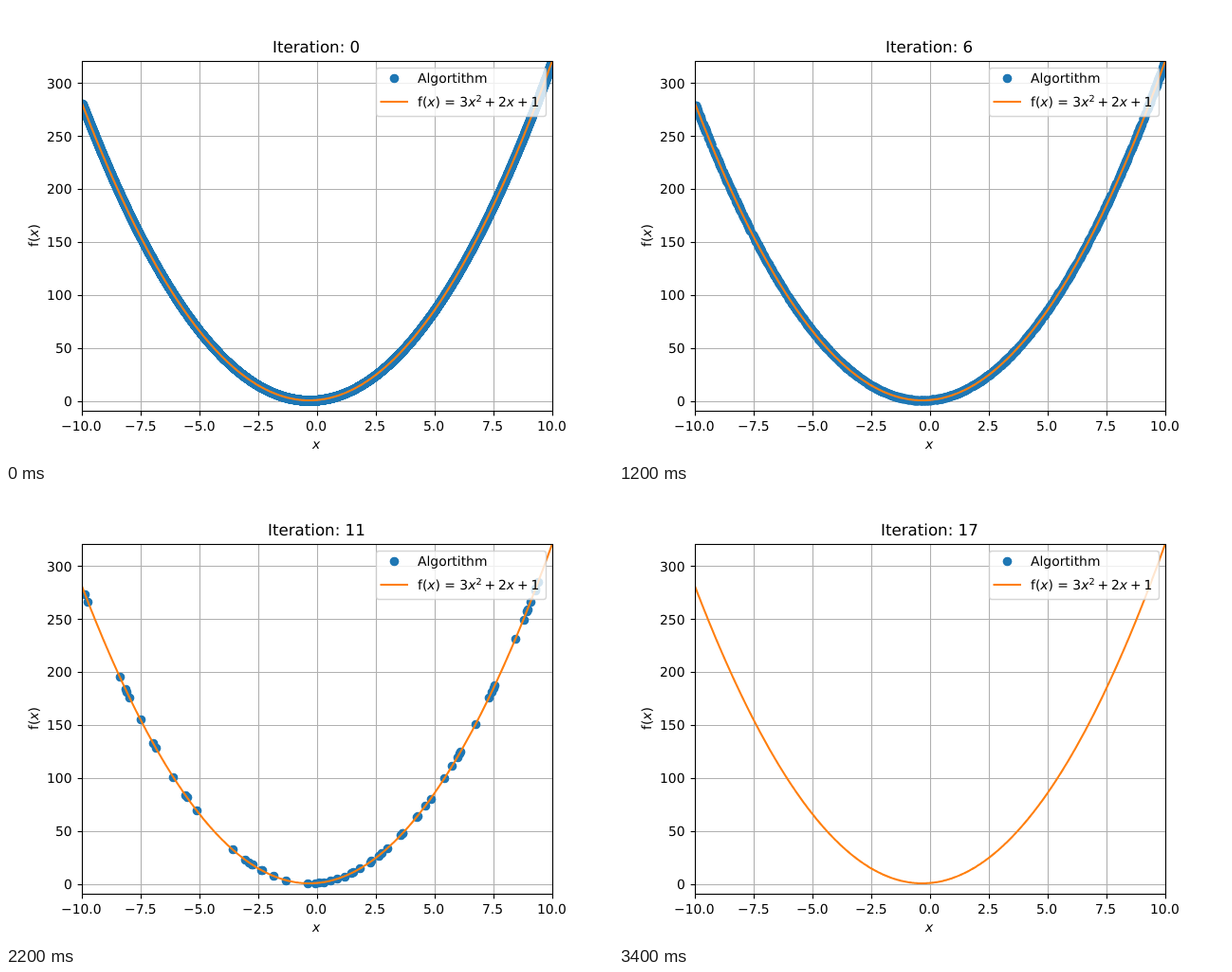
These frames come from a looping animation (640 px wide and 480 px high, 3.6 s). An HTML page with a canvas:

```html
<!DOCTYPE html>
<html lang="en">
<head>
<meta charset="utf-8">
<title>Parabola search</title>
<style>
  html, body { margin: 0; width: 100%; height: 100%; overflow: hidden; background: #fff; }
  canvas { display: block; }
</style>
</head>
<body>
<canvas id="stage" width="640" height="480"></canvas>
<script>
const ctx = document.getElementById('stage').getContext('2d');
const STEP = 200, STEPS = 18, LAST_POPULATED = 15;
const BLUE = '#1f77b4', ORANGE = '#ff7f0e', GRID = '#b0b0b0';
const LEFT = 80, RIGHT = 576, TOP = 57.6, BOTTOM = 427.2;
const X_SCALE = 24.8, Y_MIN = -9.33, Y_MAX = 321;
const SIZE = 13.89, THIN = 1.11, TICK = 4.86;
const FAMILY = '"DejaVu Sans", sans-serif';

const f = x => 3 * x * x + 2 * x + 1;
const toX = x => LEFT + (x + 10) * X_SCALE;
const toY = y => BOTTOM - (y - Y_MIN) / (Y_MAX - Y_MIN) * (BOTTOM - TOP);
const crisp = v => Math.round(v) + 0.5;

// The longest-lived candidates come first; the rest are spread at random.
const candidates = [-3.6, 0.55, 3.55, 1.15, -2.35, -9.87, 6.05, -6.12, 2.63,
  -9.74, 7.3, 0.85, -6.86, -5.6, -5.54, -2.75, 1.83, 4.23];
let seed = 20;
while (candidates.length < 12000) {
  seed = (Math.imul(seed, 1664525) + 1013904223) >>> 0;
  candidates.push(seed / 2 ** 32 * 20 - 10);
}

function population(step) {
  const size = step > LAST_POPULATED ? 0 : Math.floor(400 * 0.54 ** (step - 8));
  return candidates.slice(0, size);
}

const dot = document.createElement('canvas');
dot.width = dot.height = 11;
const dotCtx = dot.getContext('2d');
dotCtx.fillStyle = BLUE;
dotCtx.arc(5.5, 5.5, 4.86, 0, Math.PI * 2);
dotCtx.fill();

function drawDot(x, y) {
  ctx.drawImage(dot, Math.round(x) - 5, Math.round(y) - 5);
}

function line(x1, y1, x2, y2, color, width) {
  ctx.strokeStyle = color;
  ctx.lineWidth = width;
  ctx.beginPath();
  ctx.moveTo(x1, y1);
  ctx.lineTo(x2, y2);
  ctx.stroke();
}

// Returns the x position at which the text ends.
function text(str, x, y, size = SIZE, style = '') {
  ctx.font = `${style} ${size}px ${FAMILY}`;
  ctx.fillStyle = '#000';
  ctx.fillText(str, x, y);
  return x + ctx.measureText(str).width;
}
const italic = (str, x, y) => text(str, x, y, SIZE, 'italic');

// share is the part of the text's width left of x: 0.5 centres it, 1 ends it there.
function alignedText(str, x, y, share, size = SIZE, style = '') {
  ctx.font = `${style} ${size}px ${FAMILY}`;
  text(str, Math.floor(x - ctx.measureText(str).width * share), y, size, style);
}

function fOfX(x, y) {
  return text(')', italic('x', text('f(', x, y), y), y);
}

function drawGrid() {
  for (let x = -10; x <= 10; x += 2.5) line(crisp(toX(x)), 58, crisp(toX(x)), 427, GRID, THIN);
  for (let y = 0; y <= 300; y += 50) line(LEFT, crisp(toY(y)), RIGHT, crisp(toY(y)), GRID, THIN);
}

function drawTicks() {
  for (let x = -10; x <= 10; x += 2.5) {
    const px = toX(x);
    line(crisp(px), 428, crisp(px), 427.5 + TICK, '#000', THIN);
    alignedText(x.toFixed(1).replace('-', '\u2212'), px, 448, 0.5);
  }
  for (let y = 0; y <= 300; y += 50) {
    const py = toY(y);
    line(LEFT, crisp(py), 80.5 - TICK, crisp(py), '#000', THIN);
    alignedText(String(y), 70.3, Math.round(py + 5.5), 1);
  }
}

function drawCurve() {
  ctx.strokeStyle = ORANGE;
  ctx.lineWidth = 2.08;
  ctx.lineJoin = 'round';
  ctx.beginPath();
  for (let x = -10; x <= 10; x += 0.05) ctx.lineTo(toX(x), toY(f(x)));
  ctx.lineTo(toX(10), toY(f(10)));
  ctx.stroke();
}

function drawLegend() {
  ctx.beginPath();
  ctx.roundRect(390.5, 65.5, 179, 51, 2.8);
  ctx.fillStyle = 'rgba(255,255,255,0.8)';
  ctx.fill();
  ctx.strokeStyle = 'rgba(204,204,204,0.8)';
  ctx.lineWidth = 1.39;
  ctx.stroke();

  drawDot(409, 76);
  line(394.5, 101, 424, 101, ORANGE, 2.08);
  text('Algortithm', 434, 81);

  const base = 106, gap = 2.9;
  let x = fOfX(434, base);
  x = text(' = 3', x, base);
  x = italic('x', x, base);
  x = text('2', x, base - 5, SIZE * 0.7);
  x = text('+', x + gap, base);
  x = text('2', x + gap, base);
  x = italic('x', x, base);
  x = text('+', x + gap, base);
  text('1', x + gap, base);
}

function drawLabels(step) {
  alignedText('Iteration: ' + step, 328, 49, 0.5, 16.67);
  alignedText('x', 328, 467, 0.5, SIZE, 'italic');
  ctx.save();
  ctx.translate(34, 254);
  ctx.rotate(-Math.PI / 2);
  fOfX(0, 0);
  ctx.restore();
}

function draw(step) {
  ctx.textRendering = 'geometricPrecision';
  ctx.fillStyle = '#fff';
  ctx.fillRect(0, 0, 640, 480);

  ctx.save();
  ctx.beginPath();
  ctx.rect(LEFT, 58, RIGHT - LEFT, 369);
  ctx.clip();
  drawGrid();
  for (const x of population(step)) drawDot(toX(x), toY(f(x)));
  drawCurve();
  ctx.restore();

  drawTicks();
  ctx.strokeStyle = '#000';
  ctx.lineWidth = THIN;
  ctx.strokeRect(80.5, 58.5, 496, 369);
  drawLabels(step);
  drawLegend();
}

let shown = -1;
const start = performance.now();
function tick() {
  const step = Math.floor((performance.now() - start) / STEP) % STEPS;
  if (step !== shown) draw(shown = step);
  requestAnimationFrame(tick);
}
tick();
</script>
</body>
</html>
```
